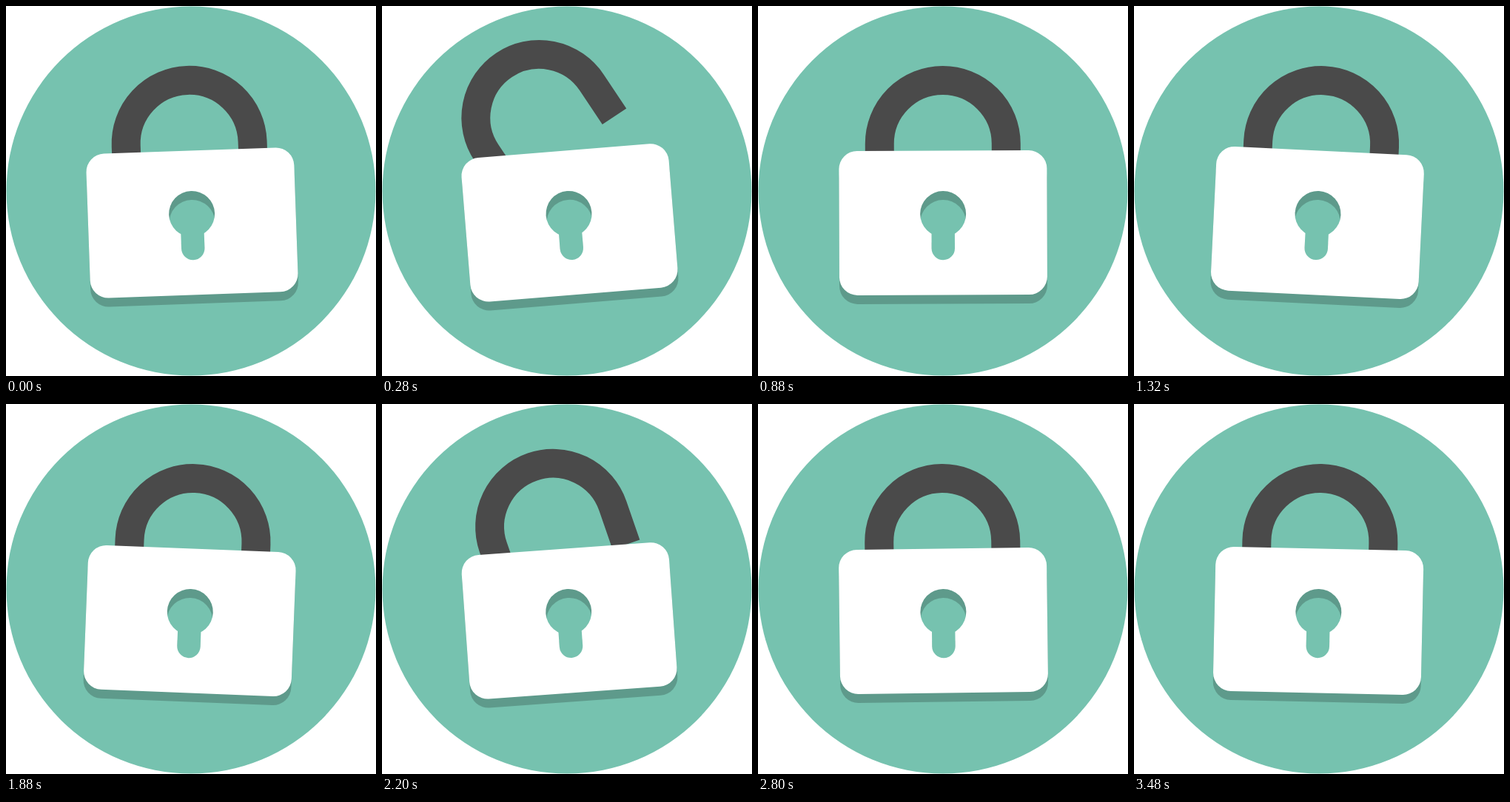
An HTML page for the animation above (3520 ms loop, 500 by 500 pixels).

```html
<!DOCTYPE html>
<html lang="en">
<head>
<meta charset="utf-8">
<title>Padlock</title>
<style>
  html, body { margin: 0; width: 100%; height: 100%; overflow: hidden; background: #fff; }
  svg { display: block; width: 100%; height: 100%; }
</style>
</head>
<body>
<svg viewBox="0 0 500 500">
  <defs>
    <!-- Rounded plate with a keyhole cut out -->
    <mask id="keyhole">
      <rect width="500" height="500" fill="#fff"/>
      <circle cx="250" cy="281" r="31"/>
      <path d="M250 281V327.5" stroke="#000" stroke-width="31.4" stroke-linecap="round"/>
    </mask>
    <rect id="plate" x="109.5" y="195.5" width="281" height="195" rx="24.5" mask="url(#keyhole)"/>
  </defs>
  <circle cx="250" cy="250" r="249.5" fill="#76c2af"/>
  <g id="lock">
    <use href="#plate" y="12" opacity=".2"/>
    <path id="shackle" d="M164.5 241V186a85.5 85.5 0 0 1 171 0V241" fill="none" stroke="#4a4a4a" stroke-width="39"/>
    <use href="#plate" fill="#fff"/>
  </g>
</svg>
<script>
  const LOOP = 3520, STEP = 40, TUG = 2090, LEAD = 320;
  const lock = document.getElementById('lock');
  const shackle = document.getElementById('shackle');

  // Sine ease from 0 to 1 between two times
  function ease(t, from, to) {
    const u = Math.min(1, Math.max(0, (t - from) / (to - from)));
    return (1 - Math.cos(Math.PI * u)) / 2;
  }

  // Swing left, recoil, settle, then lean to the right again
  function tilt(t, lean) {
    return 3 - 8 * ease(t, 0, 550) + 5.9 * ease(t, 550, 865)
      - 1.6 * ease(t, 865, 1030) + (lean + 0.7) * ease(t, 1030, 1750);
  }

  // The shackle springs open during the swing and closes more slowly
  function opening(t) {
    return -30 * (ease(t, 310, 550) - ease(t, 550, 1000));
  }

  function draw() {
    const now = Math.floor(performance.now() % LOOP / STEP) * STEP + LEAD;
    const t = now % TUG;
    const lean = now < TUG ? 3 : 1.25;
    lock.setAttribute('transform', `rotate(${tilt(t, lean)} 250 250)`);
    shackle.setAttribute('transform', `rotate(${opening(t)} 162.5 224)`);
    requestAnimationFrame(draw);
  }
  draw();
</script>
</body>
</html>
```
